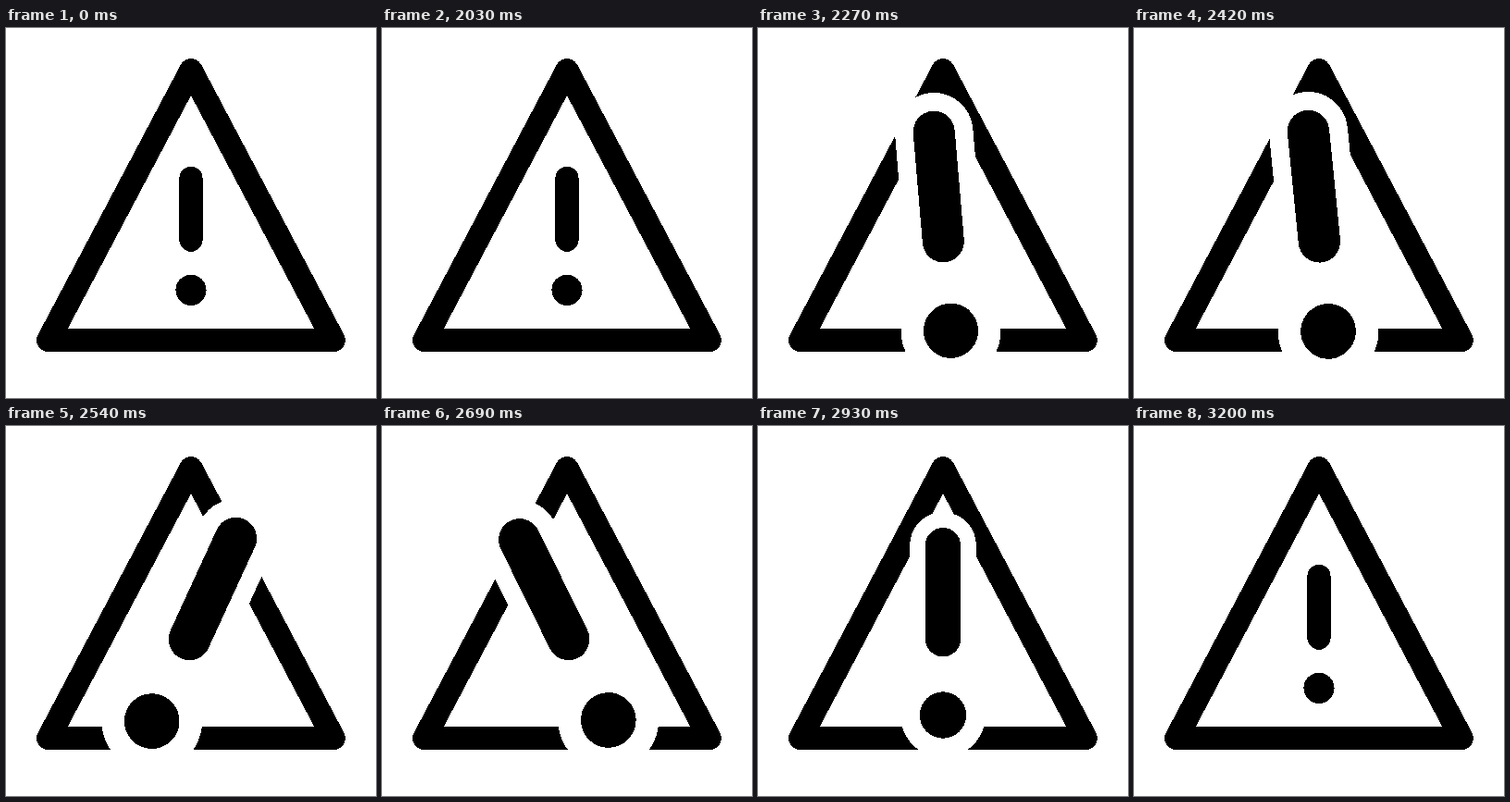
An HTML page that plays this animation: 400 px wide and 400 px high, repeating every 3.23 s.

```html
<!DOCTYPE html>
<html lang="en">
<head>
<meta charset="utf-8">
<title>Warning</title>
<style>
  html, body { margin: 0; width: 100%; height: 100%; overflow: hidden; background: #fff; }
  svg { display: block; width: 100%; height: 100%; shape-rendering: crispEdges; }
  line, path { fill: none; stroke-linecap: round; stroke-linejoin: round; }
</style>
</head>
<body>
<svg viewBox="0 0 400 400">
  <path d="M200 45.83 354.17 337.5H45.83Z" stroke="#000" stroke-width="25.4"/>
  <g id="mark">
    <g fill="#fff" stroke="#fff">
      <line x1="200" y1="162.5" x2="200" y2="229.17" stroke-width="47.3"/>
      <circle cx="200" cy="283.33" r="30.2" stroke="none"/>
    </g>
    <g fill="#000" stroke="#000">
      <line x1="200" y1="162.5" x2="200" y2="229.17" stroke-width="25.2"/>
      <circle cx="200" cy="283.33" r="16.6" stroke="none"/>
    </g>
  </g>
</svg>
<script>
  const LOOP = 3230, START = 2030, STEP = 30;
  const PIVOT = [200, 227];

  // [time in ms, value]
  const SCALE = [[2030, 1], [2290, 1.8], [2750, 1.8], [3200, 1]];
  const ANGLE = [[2010, 0], [2173, 30], [2348, -30], [2513, 30], [2660, -30], [2795, 0]];

  const mark = document.getElementById('mark');
  const ease = x => x * x * (3 - 2 * x);

  function valueAt(keys, t) {
    if (t <= keys[0][0]) return keys[0][1];
    for (let i = 1; i < keys.length; i++) {
      const [t0, a] = keys[i - 1], [t1, b] = keys[i];
      if (t < t1) return a + (b - a) * ease((t - t0) / (t1 - t0));
    }
    return keys[keys.length - 1][1];
  }

  function draw(ms) {
    const t = ms % LOOP;
    const held = t < START ? 0 : START + Math.floor((t - START) / STEP) * STEP;
    const s = valueAt(SCALE, held);
    const a = held <= START ? 0 : valueAt(ANGLE, held);
    const [x, y] = PIVOT;
    mark.setAttribute('transform',
      `translate(${x} ${y}) rotate(${a}) scale(${s}) translate(${-x} ${-y})`);
  }

  const begin = performance.now();
  function tick() {
    draw(performance.now() - begin);
    requestAnimationFrame(tick);
  }
  tick();
</script>
</body>
</html>
```
